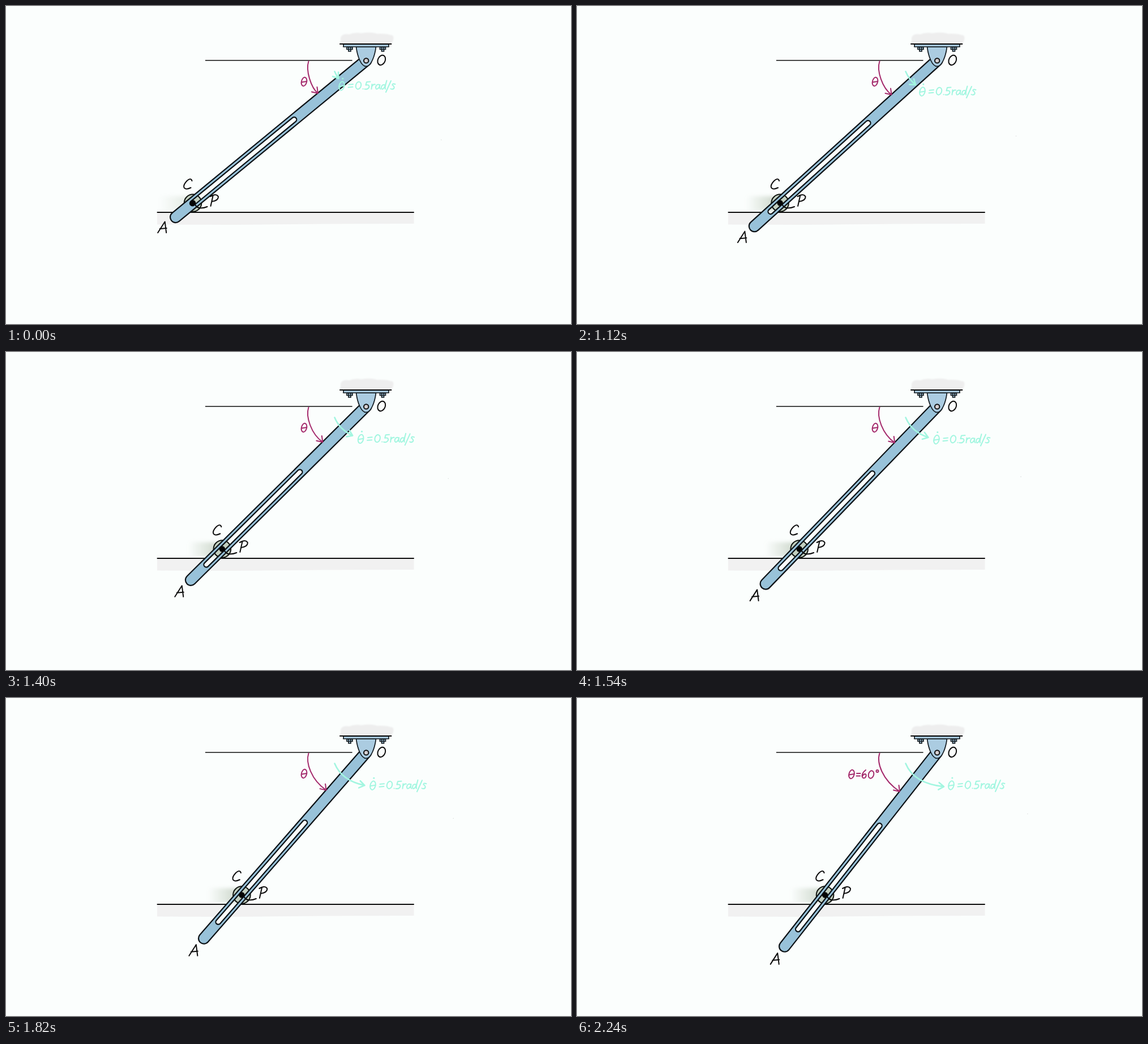
Animation of 998x561 px, one loop 4480 ms. Source, as an HTML page:

```html
<!DOCTYPE html>
<html lang="en">
<head>
<meta charset="utf-8">
<title>Slotted arm</title>
<style>
  html, body { margin: 0; width: 100%; height: 100%; overflow: hidden; background: #fbfefd; }
  svg { display: block; width: 100vw; height: 100vh; }
  .pen { fill: none; stroke: #0c0c0c; stroke-width: 2; stroke-linecap: round; stroke-linejoin: round; }
  .mint { stroke: #a2f6e0; }
  .plum { stroke: #a42a6c; }
  .steel { fill: #98c2d9; stroke: #0c1216; stroke-width: 2.2; }
  .plate { fill: #abcce1; stroke: #10181e; stroke-width: 1.7; }
</style>
</head>
<body>
<svg viewBox="0 0 998 561" role="img" aria-label="Slotted arm OA turning about O, with roller C and pin P, at 0.5 rad/s">
  <defs>
    <linearGradient id="fade">
      <stop offset="0" stop-color="#b4c2b0" stop-opacity="0"/>
      <stop offset="1" stop-color="#b4c2b0" stop-opacity=".65"/>
    </linearGradient>
    <filter id="soft" x="-20%" y="-40%" width="140%" height="180%"><feGaussianBlur stdDeviation="3"/></filter>
    <filter id="wash" x="-10%" y="-30%" width="120%" height="160%"><feGaussianBlur stdDeviation="1.3"/></filter>
    <g id="theta">
      <ellipse rx="4.6" ry="7.8" transform="rotate(14)"/>
      <path d="M-4.6 1L4.7 -.6"/>
    </g>
    <g id="bolt" class="plate">
      <path d="M-2 76h4v4h-4z"/>
      <path d="M-5 72.5h10v4h-10zM-1.8 72.5v4M1.8 72.5v4"/>
    </g>
  </defs>

  <!-- floor, ceiling and reference line -->
  <path d="M267 365H720.5V384L560 384.5L400 386L267 385.5Z" fill="#f1f1f1"/>
  <path class="pen" d="M267.5 364H720"/>
  <path d="M591 66V56Q594 48 606 50Q616 46 628 48Q644 45 656 49Q670 48 683 52Q687 57 681 66Z" fill="#eee" filter="url(#wash)"/>
  <path class="pen" d="M352.5 96H611" style="stroke-width:1.6"/>

  <!-- arm and roller -->
  <g class="turn"><path d="M-164.5 0H-397" stroke="#fbfefd" stroke-width="9" stroke-linecap="round"/></g>
  <g class="ride">
    <rect id="trail" x="-60" y="-12" width="54" height="26" rx="6" fill="url(#fade)" filter="url(#soft)"/>
    <circle r="15.3" fill="#c3d0c0" stroke="#10140f" stroke-width="2"/>
  </g>
  <g class="turn">
    <path class="steel" fill-rule="evenodd" d="M0 -9.6H-435.4a9.6 9.6 0 0 0 0 19.2H0a9.6 9.6 0 0 0 0 -19.2Z
      M-164.5 -4.4H-397a4.4 4.4 0 0 0 0 8.8H-164.5a4.4 4.4 0 0 0 0 -8.8Z"/>
    <circle cx="13.8" cy="192.6" r=".6" fill="#c9cdcb"/>
  </g>

  <!-- bracket -->
  <use href="#bolt" x="607"/>
  <use href="#bolt" x="665.5"/>
  <path class="plate" d="M618.5 72C620.5 88 627 106.5 636 106.5C645 106.5 651.5 88 653.5 72Z"/>
  <path class="plate" d="M596 67.5H676V72H596Z"/>
  <path class="pen" d="M590 67H680.5"/>
  <circle cx="636.2" cy="96.4" r="4.2" fill="#d5d0d2" stroke="#0c0c0c" stroke-width="2"/>

  <!-- lettering -->
  <ellipse class="pen" cx="663.3" cy="95.5" rx="6.4" ry="9" transform="rotate(24 663.3 95.5)"/>
  <path id="endName" class="pen" d="M0 0L12.500 -19.500L15 0M3.500 -7L15.500 -8"/>
  <g class="pen ride">
    <circle r="5.2" fill="#050505" stroke="none"/>
    <path d="M-1.5 -39Q-3 -45 -10 -39.5Q-17.5 -32 -15.5 -27Q-12.5 -22.5 -3.5 -27"/>
    <path d="M4 3Q7 9 14 9Q20 9 25.5 6.5"/>
    <path d="M35.5 -12.5L31.5 5.5M31 -11.5Q42 -17.5 45 -11Q45 -4 33.5 -2.5"/>
  </g>
  <g class="pen plum">
    <path id="angle"/>
    <use id="angleName" href="#theta" x="526.5" y="133.5"/>
    <g id="angleValue">
      <use href="#theta" x="485" y="134.5"/>
      <path d="M494 133H500.5M493.5 137.5H500M510 127Q503.5 132 503.5 138Q505 143 509 140.5Q512.5 135.5 509 134Q505.5 134.5 504 138"/>
      <ellipse cx="519.5" cy="135" rx="4.6" ry="6.8" transform="rotate(16 519.5 135)"/>
      <circle cx="530.5" cy="129" r="2"/>
    </g>
  </g>
  <g class="pen mint">
    <path id="sweep" style="stroke-width:2.6"/>
    <g id="rate">
      <use href="#theta" x="6"/>
      <path d="M7.8 -13h.1" style="stroke-width:3"/>
      <path d="M18.5 -2.3L26 -3M17.5 2.5L25.5 1.8M43.5 5.2h.2"/>
      <ellipse cx="35.5" cy="-.8" rx="4.6" ry="6.6" transform="rotate(16 35.5 -.8)"/>
      <path d="M56.5 -7.5L50 -7L48.5 -1.5Q55 -3 54.500 2Q52 7 46.500 5.500"/>
      <path d="M59.5 -3L58.5 5.5M59 1.5Q61.5 -3.5 65 -2.5"/>
      <path d="M73 -2Q67.5 -4 66 2Q66 7 69.5 5Q73 2.5 73.5 -2Q72 4 74.5 5.5"/>
      <path d="M82.5 -1.5Q77 -3.5 76 2.5Q76.5 7.5 80 4.5Q83 1 85.5 -9.5Q82 2 83 5.5"/>
      <path d="M93 -9L84 11M100.5 -3Q95 -5 95.5 -1.5Q99.5 1 98.5 4Q96 7 92.5 5"/>
    </g>
  </g>
</svg>
<script>
const $ = id => document.getElementById(id);
const LOOP = 4480, FIRST = 840, STEP = 140, LAST = 10;
const PIVOT = [636, 96], PIN_DROP = 251.5, ARM = 435.4, EDGE = 9.2;

// poses at a few steps; the steps between are blended evenly
const KEYS = [
  { step: 0, turn: 39.42, sweep: .19, rate: [587, 141] },
  { step: 3, turn: 42.2, sweep: .4, rate: [604, 151] },
  { step: 6, turn: 45.95, sweep: .71, rate: [629, 154.5] },
  { step: LAST, turn: 51.8, sweep: 1, rate: [655, 154] }
];

const lerp = (a, b, t) => a + (b - a) * t;
const mix = (p, q, t) => p.map((v, i) => lerp(v, q[i], t));
const move = (el, x, y) => el.setAttribute('transform', `translate(${x} ${y})`);
const each = (name, fn) => document.querySelectorAll(name).forEach(fn);
const show = (id, on) => $(id).setAttribute('visibility', on ? 'visible' : 'hidden');

function poseAt(k) {
  const i = Math.max(1, KEYS.findIndex(key => key.step >= k));
  const a = KEYS[i - 1], b = KEYS[i], t = (k - a.step) / (b.step - a.step);
  return { turn: lerp(a.turn, b.turn, t), sweep: lerp(a.sweep, b.sweep, t), rate: mix(a.rate, b.rate, t) };
}

// first part, up to t, of a quadratic curve, with an arrow head
function sweepPath(t) {
  const a = [580.5, 115.5], b = [595, 151], c = [648, 156.3];
  const ctrl = mix(a, b, t), next = mix(b, c, t), tip = mix(ctrl, next, t);
  const back = Math.atan2(ctrl[1] - next[1], ctrl[0] - next[0]);
  const barb = turn => [tip[0] + 11 * Math.cos(back + turn), tip[1] + 11 * Math.sin(back + turn)];
  return `M${a}Q${ctrl} ${tip}M${barb(.6)}L${tip}L${barb(-.6)}`;
}

function anglePath(x, y) {
  return `M534.5 97.5C529 114 539 144.5 ${x} ${y}M${x - 11} ${y - 2.5}L${x} ${y}L${x - 1.5} ${y - 11}`;
}

function draw(step) {
  const k = Math.min(step, LAST), done = step > LAST;
  const { turn, sweep, rate } = poseAt(k);
  const rad = turn * Math.PI / 180, cos = Math.cos(rad), sin = Math.sin(rad);
  // point on the arm: distance from the pivot, height above the centre line
  const onArm = (far, up) => [PIVOT[0] - far * cos - up * sin, PIVOT[1] + far * sin - up * cos];
  const end = onArm(ARM, 0);

  each('.turn', el => el.setAttribute('transform', `translate(${PIVOT}) rotate(${-turn})`));
  each('.ride', el => move(el, PIVOT[0] - PIN_DROP / Math.tan(rad), PIVOT[1] + PIN_DROP));
  move($('endName'), end[0] - 31.5 + .65 * k, end[1] + 27.5 + .4 * k);
  move($('rate'), ...rate);
  $('trail').setAttribute('opacity', k ? 1 : .5);
  $('sweep').setAttribute('d', sweepPath(sweep));
  $('angle').setAttribute('d', anglePath(...onArm(102.5 - .75 * k, EDGE)));
  show('angleName', !done);
  show('angleValue', done);
}

let shown = -1;
function tick() {
  const t = performance.now() % LOOP;
  const step = t < FIRST ? 0 : Math.min(1 + Math.floor((t - FIRST) / STEP), LAST + 1);
  if (step !== shown) draw(shown = step);
  requestAnimationFrame(tick);
}
tick();
</script>
</body>
</html>
```
